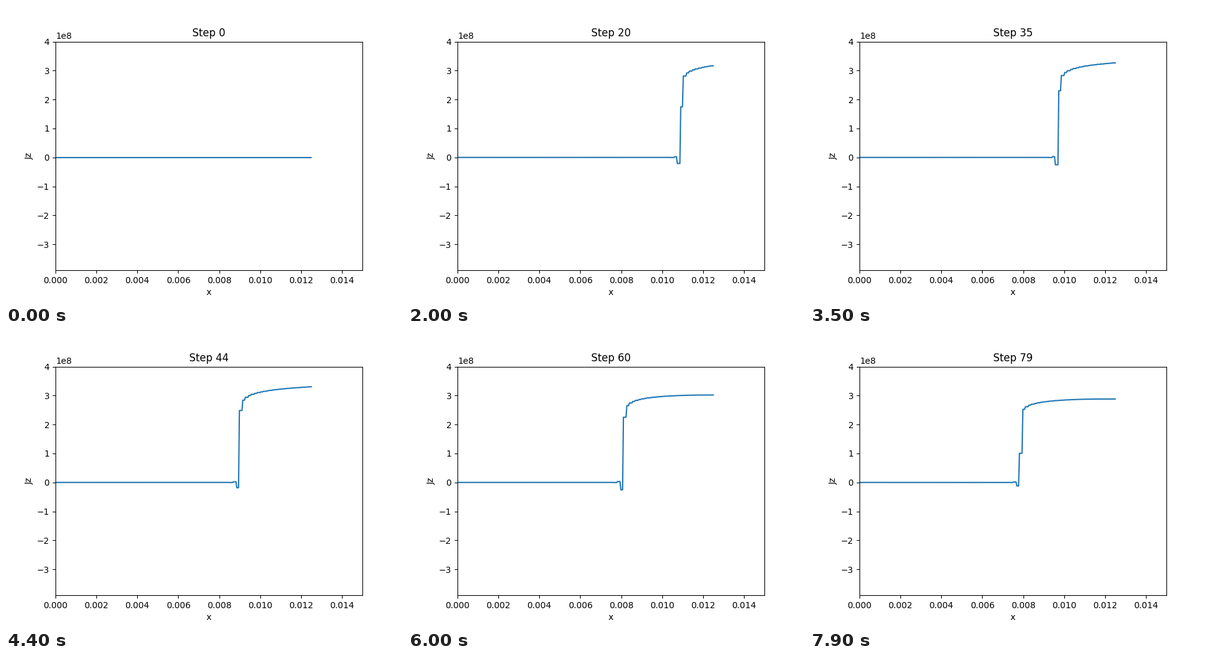
These frames come from a looping animation (640x480 px, 8000 ms). A matplotlib script:

```python
import numpy as np
import matplotlib.pyplot as plt
from matplotlib.animation import FuncAnimation

STEPS = 80
CELLS = 85          # counted from the surface inwards
RADIUS = 0.0125
POWER = 21          # E = (J / JC) ** POWER
JC = 2.785          # in units of 1e8
COUPLING = 0.095    # off-diagonal share of the element mass matrix

# Enclosed current: ramp up, then hold with a slight droop.
RAMP_T = [0, 9, 20, 35, 44, 49.7, 79]
RAMP_I = [0, 13.76, 30.05, 52.2, 64.96, 72.6, 72.2]

r = 1 - (np.arange(CELLS) + 0.5) / CELLS
curl = (np.eye(CELLS, CELLS + 1) - np.eye(CELLS, CELLS + 1, 1)) / r[:, None]
mass = np.zeros((CELLS + 1, CELLS + 1))
for c in range(CELLS):
    a, b = 0.5 - COUPLING, COUPLING
    mass[c:c + 2, c:c + 2] += np.array([[a, b], [b, a]]) / r[c]
free = slice(1, CELLS)


def energy(u, old):
    d = u - old
    s = np.abs(curl @ u) / JC
    return 0.5 * d @ mass @ d + np.sum(r * s ** (POWER + 1)) * JC / (POWER + 1)


def advance(old, current):
    """One implicit time step, solved by damped Newton iterations."""
    u = old.copy()
    u[0] = current
    f = energy(u, old)
    for _ in range(80):
        j = curl @ u
        s = np.abs(j) / JC
        field = np.sign(j) * s ** POWER
        slope = POWER / JC * s ** (POWER - 1)
        grad = mass @ (u - old) + curl.T @ (r * field)
        hess = mass + curl.T @ ((r * slope)[:, None] * curl)
        move = np.zeros_like(u)
        move[free] = -np.linalg.solve(hess[free, free], grad[free])
        scale = 1.0
        while scale > 1e-8:
            trial = u + scale * move
            f_trial = energy(trial, old)
            if f_trial <= f:
                break
            scale /= 2
        else:
            break
        u, f = trial, f_trial
        if np.abs(move).max() < 1e-7:
            break
    return u


def simulate():
    u = np.zeros(CELLS + 1)
    profiles = [curl @ u]
    for step in range(1, STEPS):
        u = advance(u, np.interp(step, RAMP_T, RAMP_I))
        profiles.append(curl @ u)
    return np.array(profiles) * 1e8


samples = 300
x = np.linspace(0, RADIUS, samples)
depth = np.arange(samples)[::-1] + 0.1
cell = np.minimum(depth * CELLS / (samples - 1), CELLS - 1).astype(int)
profiles = simulate()

fig, ax = plt.subplots(figsize=(6.4, 4.8), dpi=100)
line, = ax.plot(x, np.zeros(samples))
ax.set_xlim(0, 0.015)
ax.set_ylim(-3.9e8, 4e8)
ax.set_xlabel("x")
ax.set_ylabel("Jz")
title = ax.set_title("Step 0")


def update(step):
    line.set_ydata(profiles[step][cell])
    title.set_text(f"Step {step}")
    return line, title


anim = FuncAnimation(fig, update, frames=STEPS, interval=100,
                     repeat=True, repeat_delay=0, blit=False)
plt.show()
```
